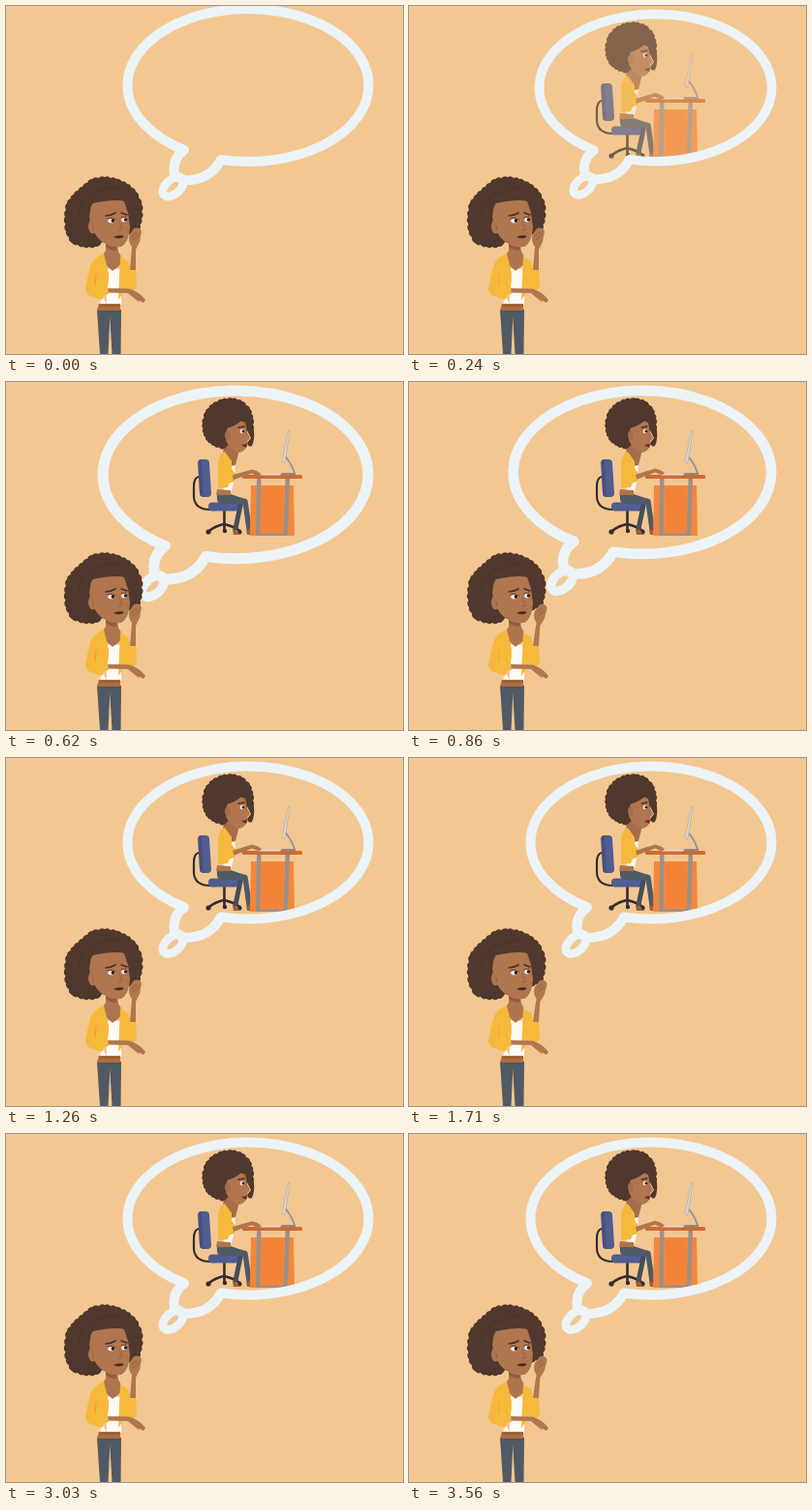
An HTML page that plays this animation: 410 by 360 pixels, repeating every 3.64 s.

```html
<!DOCTYPE html>
<html lang="en">
<head>
<meta charset="utf-8">
<title>Thinking about work</title>
<style>
html, body { margin: 0; width: 100%; height: 100%; overflow: hidden; background: #f3c791; }
svg { display: block; width: 100vw; height: 100vh; }
.line { fill: none; stroke-linecap: round; stroke-linejoin: round; }
.hair { fill: #50382e; }
.skin { fill: #b0764f; }
.coat { fill: #f7b93c; }
.jeans { fill: #4f5a65; }
</style>
</head>
<body>
<svg viewBox="0 0 410 360" preserveAspectRatio="none">
  <defs>
    <path id="cloud" d="M222 164.5A124.5 79 0 0 0 374.5 87.5A124.5 79 0 1 0 184 154.5Q171 164 174 180L184 186Q211 186 222 164.5"/>
    <clipPath id="inside"><use id="hole" href="#cloud"/></clipPath>
  </defs>
  <rect width="410" height="360" fill="#f3c791"/>

  <g clip-path="url(#inside)">
  <g id="office">
    <!-- chair -->
    <g class="line" stroke="#352c30" stroke-width="2.2">
      <path d="M199 98Q194 99 194 108V119Q195 132 211 132"/>
      <path d="M225.5 133V148M225 147Q216 149 210 154M225 147Q235 149 241 154M225.5 147V154" stroke-width="2.6"/>
    </g>
    <g fill="#352c30">
      <circle cx="209" cy="155" r="2.6"/><circle cx="226" cy="154" r="2.2"/><circle cx="241" cy="155" r="2.6"/>
    </g>
    <path d="M198 84Q198 80 202 80H206Q210 80 210 84L212 115Q212 119 208 119H204Q200 119 200 115Z" fill="#515c90"/>
    <path d="M199 84Q198 81 202 80L204 118Q200 119 200 115Z" fill="#465080"/>
    <rect x="209" y="124.5" width="32" height="9" rx="4" fill="#515c90"/>
    <!-- legs -->
    <path class="line" d="M224 121L243 123L237 152" stroke="#434e59" stroke-width="5"/>
    <path class="line" d="M223 121L247 123.5L251 152" stroke="#4f5a65" stroke-width="5.4"/>
    <path d="M218 116H232L247 121V126H221Q217 124 218 116Z" class="jeans"/>
    <path d="M234 153L239 153L241 158H235ZM248 153L253 152L255 158H249Z" fill="#9a6340"/>
    <!-- desk -->
    <path d="M253 107H297L298 159H252Z" fill="#f5873a"/>
    <path d="M265 109H286V153H265Z" fill="#f28337"/>
    <path d="M259 100H263.5L262.5 159H258ZM288.5 100H293L291 159H286.5Z" fill="#9a918c"/>
    <path d="M258 156.5H291V159H258Z" fill="#9a918c"/>
    <rect x="244" y="96" width="62" height="4" rx="1.5" fill="#cb6b33"/>
    <!-- screen -->
    <path class="line" d="M289 78Q294 83 298 94" stroke="#94949a" stroke-width="1.8"/>
    <path d="M291.5 50L293 51L288 84L285 83Z" fill="#dcd8d4" stroke="#a9a5a3" stroke-width=".6"/>
    <path d="M284 94H299V96H284Z" fill="#8c8a8d"/>
    <path d="M260 95H283V96.5H260Z" fill="#e4ddd8"/>
    <!-- body -->
    <path d="M227 77L236 80Q238 95 233 113H224Z" fill="#faf8f4"/>
    <path d="M225 62H240L240 74L237 86L232 87L224 76Z" fill="#a66d49"/>
    <path d="M218 111L232 112V117H217Z" fill="#b27347"/>
    <path d="M226 72Q220 74 219 84V110L229 109L233 99V82Z" class="coat"/>
    <path class="line" d="M227 82L226 99" stroke="#efab2e" stroke-width="1"/>
    <g id="typing">
      <path d="M223 83Q229 80 232 88L237 95L236 103L222 107Z" class="coat"/>
      <path d="M234 96L254 90Q260 91 264 95L261 97L254 94L235 101Z" class="skin"/>
    </g>
    <!-- head -->
    <path class="hair" data-curls="203 43 206 31 213 23 223 18 234 17 244 20 252 28 255 38 255 50 250 50 238 56 230 64 225 69 215 66 208 61 204 53"/>
    <path d="M229 44Q238 37 247 42L249 52L252 58L249 61L249 66Q246 73 240 73Q231 70 227 60Z" class="skin"/>
    <ellipse cx="229" cy="55" rx="3" ry="4.5" fill="#a66d49"/>
    <path d="M228 48Q239 45 246 37L234 34L222 43L225 54Z" class="hair"/>
    <ellipse cx="244" cy="51" rx="2.3" ry="2.2" fill="#f6ece4"/>
    <circle cx="245" cy="51" r="1.5" fill="#2f201c"/>
    <path class="line" d="M240 47L246 46" stroke="#46302a" stroke-width="1.3"/>
    <path d="M243 65L249 64L248 68Z" fill="#5c322b"/>
    <path d="M248 41Q255 42 256 50Q257 60 254 66Q250 68 249 63L253 58L250 52Z" class="hair"/>
  </g>
  </g>

  <g id="bubble" class="line" stroke="#ecf4f8" stroke-width="10">
    <use href="#cloud"/>
    <ellipse cx="172.5" cy="192.5" rx="12.5" ry="7.4" transform="rotate(-42 172.5 192.5)" stroke-width="8.8"/>
  </g>

  <g id="thinker">
    <path d="M94 314H119L118.5 360H109.5L107.3 322L105.5 360H97Z" class="jeans"/>
    <path class="hair" data-curls="61 218 63 204 70 195 79 187 89 179 102 177 114 179 125 184 134 192 140 205 140 220 137 232 125 236 105 240 92 249 80 249 68 245 62 233"/>
    <path d="M104 308V272H119V309H97L99 300Z" fill="#fcfaf6"/>
    <path d="M103 242H114L116 254Q121 261 118 268L110 274L102 267Q98 259 103 253Z" fill="#ad744e"/>
    <path d="M103 245L115 249L114 253Q107 253 103 249Z" fill="#8f5d40"/>
    <path d="M96 308H118V315H94Z" fill="#ad6d41"/>
    <path d="M96 310H118" stroke="#875133"/>
    <path d="M101 256Q88 261 86 273L82 292Q82 299 90 301L99 304Q107 290 106 277Z" class="coat"/>
    <path d="M118 259L126 264L128 273H134L135 289Q133 297 121 297L116 304Z" class="coat"/>
    <path class="line" d="M93 277L92 291L105 293" stroke="#e9a52b" stroke-width="1"/>
    <path d="M104 292L127 292.5Q137 295 144 304L142 307L136 304L138 307L126 297L104 296.5Z" class="skin"/>
    <path d="M84 289L105 290L106 298L90 301Q82 298 84 289Z" class="coat"/>
    <!-- head -->
    <path d="M88 203Q106 195 122 202L126 214L128 228Q127 245 119 249Q109 251 98 243Q88 234 86 218Z" class="skin"/>
    <ellipse cx="89.5" cy="228" rx="4.5" ry="7.5" class="skin"/>
    <path class="line" d="M88 225Q92 227 90 232" stroke="#95603f"/>
    <path d="M86 220Q86 208 90 204Q112 199 124 202L131 233L138 222L136 197L120 186L94 188L80 205Z" class="hair"/>
    <path class="line" d="M82 200Q95 189 116 187M75 215Q75 205 84 198" stroke="#463028" stroke-width="1"/>
    <g fill="#f6ece4"><ellipse cx="109" cy="222" rx="3.8" ry="2.5"/><ellipse cx="122" cy="221" rx="2.8" ry="2.5"/></g>
    <g fill="#2f201c"><circle cx="110.5" cy="222" r="1.9"/><circle cx="123.5" cy="221" r="1.8"/></g>
    <g class="line" stroke="#46302a" stroke-width="1.5">
      <path d="M103 217Q108 217 113 214M119 214L125 216"/>
      <path d="M105 220Q109 218 113 221M119 219L124 218" stroke-width=".9"/>
    </g>
    <path class="line" d="M117 223L120 231L116 232" stroke="#95603f"/>
    <path d="M111 239Q117 236 122 238Q119 242 111 239Z" fill="#4e2923"/>
    <g id="hand">
      <path d="M128 273L130 249Q125 242 128 236L132 230Q138 228 140 233L138 244L134 252L134 273Z" class="skin"/>
      <path class="line" d="M130 238L135 234M131 242L137 237" stroke="#95603f" stroke-width=".9"/>
    </g>
  </g>
</svg>
<script>
const LOOP = 3640;
const $ = id => document.getElementById(id);
const office = $('office'), bubble = $('bubble'), hole = $('hole'), typing = $('typing'), hand = $('hand');

// Clockwise outline whose sides each bulge into two small curls
function curls(nums) {
  const n = nums.length / 2;
  let d = `M${nums[0]} ${nums[1]}`;
  for (let i = 0; i < n; i++) {
    const x = nums[2 * i], y = nums[2 * i + 1], j = (i + 1) % n;
    const dx = nums[2 * j] - x, dy = nums[2 * j + 1] - y;
    for (const k of [0, .5])
      d += `Q${x + dx * (k + .25) + dy * .2} ${y + dy * (k + .25) - dx * .2} ${x + dx * (k + .5)} ${y + dy * (k + .5)}`;
  }
  return d + 'Z';
}
for (const p of document.querySelectorAll('[data-curls]'))
  p.setAttribute('d', curls(p.dataset.curls.split(' ').map(Number)));

const steps = [0, 160, 240, 310, 390, 560, 620, 780, 860, 940, 1020, 1180, 1260, 1340, 1410, 1490,
  1630, 1710, 1870, 1950, 2020, 2090, 2170, 2320, 2400, 2480, 2640, 2720, 2790, 2870,
  3030, 3100, 3180, 3350, 3490, 3560];
const sizes = [[0, 1], [390, .942], [620, 1.1], [860, 1.07], [1260, 1], [LOOP, 1]];
const taps = [[780, 1180], [1630, 1870], [2640, 3030], [3490, LOOP]];

function mix(keys, t) {
  const i = keys.findIndex(k => k[0] > t);
  const [t0, a] = keys[i - 1], [t1, b] = keys[i];
  return a + (b - a) * (t - t0) / (t1 - t0);
}

function draw(time) {
  const now = time % LOOP;
  const t = steps.filter(s => s <= now).pop();
  const tap = taps.some(([a, b]) => t >= a && t < b);
  // The bubble grows out of its top right corner
  const lift = t < 160 ? -5.5 : 0;
  const grow = `translate(379.5 ${4 + lift}) scale(${mix(sizes, t)}) translate(-379.5 -4)`;
  bubble.setAttribute('transform', grow);
  hole.setAttribute('transform', grow);
  office.setAttribute('opacity', t < 160 ? 0 : Math.min(1, (t - 90) / 220));
  typing.setAttribute('transform', `rotate(${Math.sin(t / 75) * 1.3} 226 88)`);
  hand.setAttribute('transform', tap ? 'rotate(4 131 272)' : '');
}

const start = performance.now();
function tick() {
  draw(performance.now() - start);
  requestAnimationFrame(tick);
}
draw(0);
requestAnimationFrame(tick);
</script>
</body>
</html>
```
